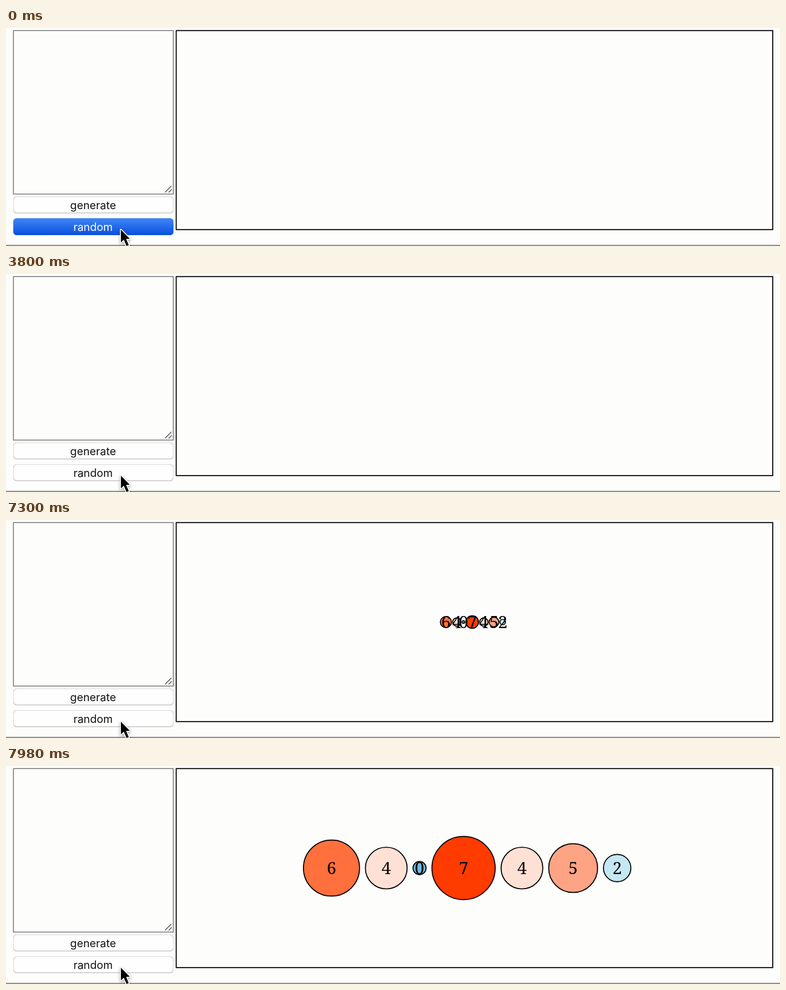
Recreate the animation shown at these times as an HTML page with a canvas. Size 1280 by 361 pixels, loop 8000 ms.

```html
<!DOCTYPE html>
<html lang="en">
<head>
<meta charset="utf-8">
<title>Random bubbles</title>
<style>
html, body { margin: 0; width: 1280px; height: 361px; overflow: hidden; background: #fdfdfc; }
canvas { display: block; }
</style>
</head>
<body>
<canvas id="stage" width="1280" height="361"></canvas>
<script>
const ctx = document.getElementById('stage').getContext('2d');
const LOOP = 8000, RELEASE = 2820, APPEAR = 140;
const VALUES = [6, 4, 0, 7, 4, 5, 2];
const FILLS = { 0: '#74b9e0', 2: '#c5e7f2', 4: '#ffe0d4', 5: '#ffa385', 6: '#ff703c', 7: '#ff3b00' };
const CENTER = { x: 774.5, y: 169 };
const GAP = 9.7;

const radius = v => 10.8 + 5.93 * v;

// Bubbles in a row, offset from the midpoint of the outer centres.
const row = [];
VALUES.forEach((v, i) => {
  const prev = row[i - 1];
  row.push({ v, r: radius(v), x: prev ? prev.x + prev.r + GAP + radius(v) : 0 });
});
const mid = row[row.length - 1].x / 2;
row.forEach(b => { b.x -= mid; });

// The picture steps three times every 140 ms: after 20, 100 and 20 ms.
function tick(t) {
  const m = t % 140;
  return 3 * Math.floor(t / 140) + (m >= 120 ? 2 : m >= 20 ? 1 : 0);
}

function line(x1, y1, x2, y2, color, width) {
  ctx.strokeStyle = color;
  ctx.lineWidth = width;
  ctx.beginPath();
  ctx.moveTo(x1, y1);
  ctx.lineTo(x2, y2);
  ctx.stroke();
}

function frame(x, y, w, h, color, width) {
  ctx.strokeStyle = color;
  ctx.lineWidth = width;
  ctx.strokeRect(x, y, w, h);
}

function roundBox(x, y, w, h, fill) {
  ctx.beginPath();
  ctx.roundRect(x, y, w, h, 5.5);
  ctx.fillStyle = fill;
  ctx.fill();
}

function button(y, label, pressed) {
  if (pressed) {
    const g = ctx.createLinearGradient(0, y, 0, y + 28);
    g.addColorStop(0, '#3f86f7');
    g.addColorStop(1, '#0a4fdc');
    roundBox(12, y, 265, 28, g);
  } else {
    roundBox(12, y, 265, 28, '#c3c3c3');
    roundBox(12, y, 265, 27, '#dadada');
    roundBox(13, y + 1, 263, 25.6, '#fefefe');
  }
  ctx.font = '18px Inter, "Open Sans", sans-serif';
  ctx.textAlign = 'center';
  ctx.textBaseline = 'alphabetic';
  ctx.fillStyle = pressed ? '#fff' : '#111';
  ctx.fillText(label, 144, y + 21);
}

function cursor(x, y) {
  ctx.save();
  ctx.translate(x, y);
  ctx.beginPath();
  [[0, 0], [0, 21], [4.8, 16.6], [9.3, 27], [13, 25.4], [8.6, 15.3], [14.8, 15]]
    .forEach(p => ctx.lineTo(...p));
  ctx.closePath();
  ctx.lineJoin = 'round';
  ctx.shadowColor = 'rgba(0,0,0,.4)';
  ctx.shadowBlur = 4;
  ctx.shadowOffsetY = 1.5;
  ctx.strokeStyle = '#fff';
  ctx.lineWidth = 3;
  ctx.stroke();
  ctx.shadowColor = 'transparent';
  ctx.fillStyle = '#000';
  ctx.fill();
  ctx.restore();
}

function bubbles(step) {
  if (step < APPEAR) return;
  const scale = Math.pow(Math.max(0, step - 145.4) / 25.6, 2.04);
  ctx.strokeStyle = '#000';
  ctx.lineWidth = 1.7;
  row.forEach(b => {
    if (!scale) return;
    ctx.beginPath();
    ctx.arc(CENTER.x + b.x * scale, CENTER.y, b.r * scale, 0, 2 * Math.PI);
    ctx.fillStyle = FILLS[b.v];
    ctx.fill();
    ctx.stroke();
  });
  ctx.font = '28px "Noto Serif", "Liberation Serif", serif';
  ctx.textAlign = 'center';
  ctx.textBaseline = 'alphabetic';
  ctx.fillStyle = '#000';
  row.forEach(b => ctx.fillText(b.v, CENTER.x + b.x * scale, 179));
}

function draw(t) {
  ctx.fillStyle = '#fdfdfc';
  ctx.fillRect(0, 0, 1280, 361);
  frame(12.3, 4.3, 264.3, 270.7, '#757575', 1.4);
  line(263, 272, 273.5, 261.5, '#555', 1.4);
  line(269, 272.3, 274, 267.3, '#555', 1.4);
  frame(281.5, 4.3, 986.5, 329.5, '#000', 1.7);
  line(0, 360, 1280, 360, '#6c6c6c', 1.5);
  button(279, 'generate', false);
  button(315, 'random', t < RELEASE);
  bubbles(tick(t));
  cursor(190, 334);
}

function loop() {
  draw(performance.now() % LOOP);
  requestAnimationFrame(loop);
}
loop();
</script>
</body>
</html>
```
